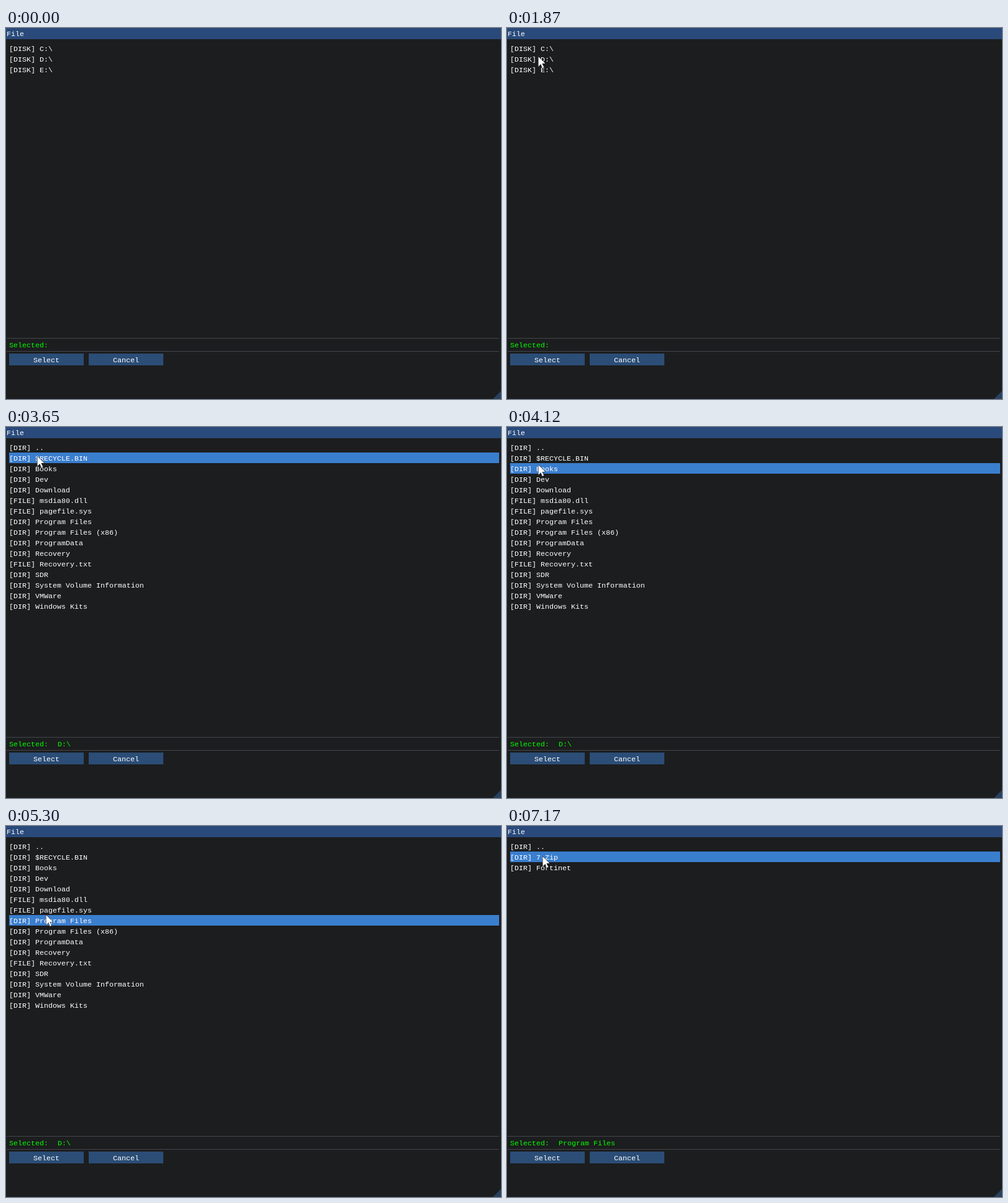
These frames come from a looping animation (796 by 596 pixels, 8 s). An HTML page with a canvas:

```html
<!DOCTYPE html>
<html lang="en">
<head>
<meta charset="utf-8">
<title>File</title>
<style>
  html, body { margin: 0; width: 100%; height: 100%; overflow: hidden; background: #1c1d1e; }
  canvas { display: block; }
</style>
</head>
<body>
<canvas id="stage" width="796" height="596"></canvas>
<script>
const ctx = document.getElementById('stage').getContext('2d');
const LOOP = 8000, STEP = 78;
const CLICK_LEAD = 160, PRESS_LENGTH = 80;
const ROW_TOP = 24, ROW_HEIGHT = 17, BASELINE = 13;
const PAD = 5, CHAR = 7;
const COLORS = {
  back: '#1c1d1e', title: '#294a7a', button: '#2b4d76', grip: '#27415f', line: '#45464f',
  hover: '#3a7ece', active: '#4296fa', text: '#fff', selected: '#0f0'
};

const tagged = tag => name => `[${tag}] ${name}`;
const disk = tagged('DISK'), dir = tagged('DIR'), file = tagged('FILE');

const views = [
  { from: 0, selected: '', rows: ['C:\\', 'D:\\', 'E:\\'].map(disk) },
  { from: 2330, selected: 'D:\\', rows: [
    ...['..', '$RECYCLE.BIN', 'Books', 'Dev', 'Download'].map(dir),
    ...['msdia80.dll', 'pagefile.sys'].map(file),
    ...['Program Files', 'Program Files (x86)', 'ProgramData', 'Recovery'].map(dir),
    file('Recovery.txt'),
    ...['SDR', 'System Volume Information', 'VMWare', 'Windows Kits'].map(dir)
  ] },
  { from: 6010, selected: 'Program Files', rows: ['..', '7-Zip', 'Fortinet'].map(dir) }
];

// Each move continues from the last one; "via" bends its path.
const origin = { x: 398, y: 620 };
const moves = [
  { start: 460, end: 1080, to: { x: 141, y: 313 }, via: { x: 60, y: 380 } },
  { start: 1320, end: 1870, to: { x: 50, y: 46 }, via: { x: 40, y: -60 } },
  { start: 3650, end: 4440, to: { x: 49, y: 88 }, via: { x: 50, y: 52 } },
  { start: 4510, end: 5300, to: { x: 64, y: 143 }, via: { x: 43, y: 116 } },
  { start: 5380, end: 5530, to: { x: 66, y: 149 } },
  { start: 6550, end: 7020, to: { x: 56, y: 49 } },
  { start: 7170, end: 7170, to: { x: 57, y: 49 } }
];

function bend(a, b, c, p) {
  const q = 1 - p;
  return Math.round(q * q * a + 2 * q * p * b + p * p * c);
}

function pointerAt(t) {
  const index = moves.filter(m => t >= m.start).length - 1;
  if (index < 0) return null;
  const { start, end, to, via } = moves[index];
  if (t >= end) return to;
  const from = index ? moves[index - 1].to : origin;
  const mid = via || { x: (from.x + to.x) / 2, y: (from.y + to.y) / 2 };
  const gaps = Math.round((end - start) / STEP);
  const step = Math.floor((t - start) / (end - start) * gaps + 0.001);
  const p = (step + 1) / (gaps + 1);
  return { x: bend(from.x, mid.x, to.x, p), y: bend(from.y, mid.y, to.y, p) };
}

function isPressed(t) {
  return views.slice(1).some(({ from }) => {
    const since = t - (from - CLICK_LEAD);
    return since >= 0 && since < PRESS_LENGTH;
  });
}

function hoveredRow(t, pointer) {
  const focused = t >= views[1].from - CLICK_LEAD;
  return focused ? Math.floor((pointer.y - ROW_TOP) / ROW_HEIGHT) : -1;
}

function rect(color, x, y, w, h) {
  ctx.fillStyle = color;
  ctx.fillRect(x, y, w, h);
}

function label(text, x, y, color = COLORS.text) {
  ctx.fillStyle = color;
  ctx.fillText(text, x, y);
}

function polygon(points) {
  ctx.beginPath();
  points.forEach(([x, y]) => ctx.lineTo(x, y));
  ctx.closePath();
}

function drawButton(text, x) {
  const width = 120;
  rect(COLORS.button, x, 523, width, 19);
  label(text, x + (width - text.length * CHAR) / 2, 537);
}

function drawPointer({ x, y }) {
  ctx.save();
  ctx.translate(x + 0.5, y);
  polygon([[0, 0], [0, 16], [4, 12], [6, 18], [9, 17], [6, 11], [11, 11]]);
  ctx.strokeStyle = '#000';
  ctx.stroke();
  ctx.fillStyle = '#fff';
  ctx.fill();
  ctx.restore();
}

function draw(t) {
  const view = views.filter(v => t >= v.from).pop();
  const pointer = pointerAt(t);
  const hovered = hoveredRow(t, pointer);

  rect(COLORS.back, 0, 0, 796, 596);
  rect(COLORS.title, 0, 0, 796, 18);
  ctx.font = '11.667px "Liberation Mono", monospace';
  label('File', 1, BASELINE);

  view.rows.forEach((text, i) => {
    const top = ROW_TOP + i * ROW_HEIGHT;
    const color = isPressed(t) ? COLORS.active : COLORS.hover;
    if (i === hovered) rect(color, PAD, top, 788, ROW_HEIGHT);
    label(text, PAD, top + BASELINE);
  });

  rect(COLORS.line, 1, 498, 792, 1);
  rect(COLORS.line, 1, 519, 792, 1);
  label('Selected:', PAD, 513, COLORS.selected);
  label(view.selected, 83, 513, COLORS.selected);
  drawButton('Select', PAD);
  drawButton('Cancel', 133);

  polygon([[796, 583], [796, 596], [783, 596]]);
  ctx.fillStyle = COLORS.grip;
  ctx.fill();
  if (pointer) drawPointer(pointer);
}

const began = performance.now();
function tick() {
  draw((performance.now() - began) % LOOP);
  requestAnimationFrame(tick);
}
tick();
</script>
</body>
</html>
```
